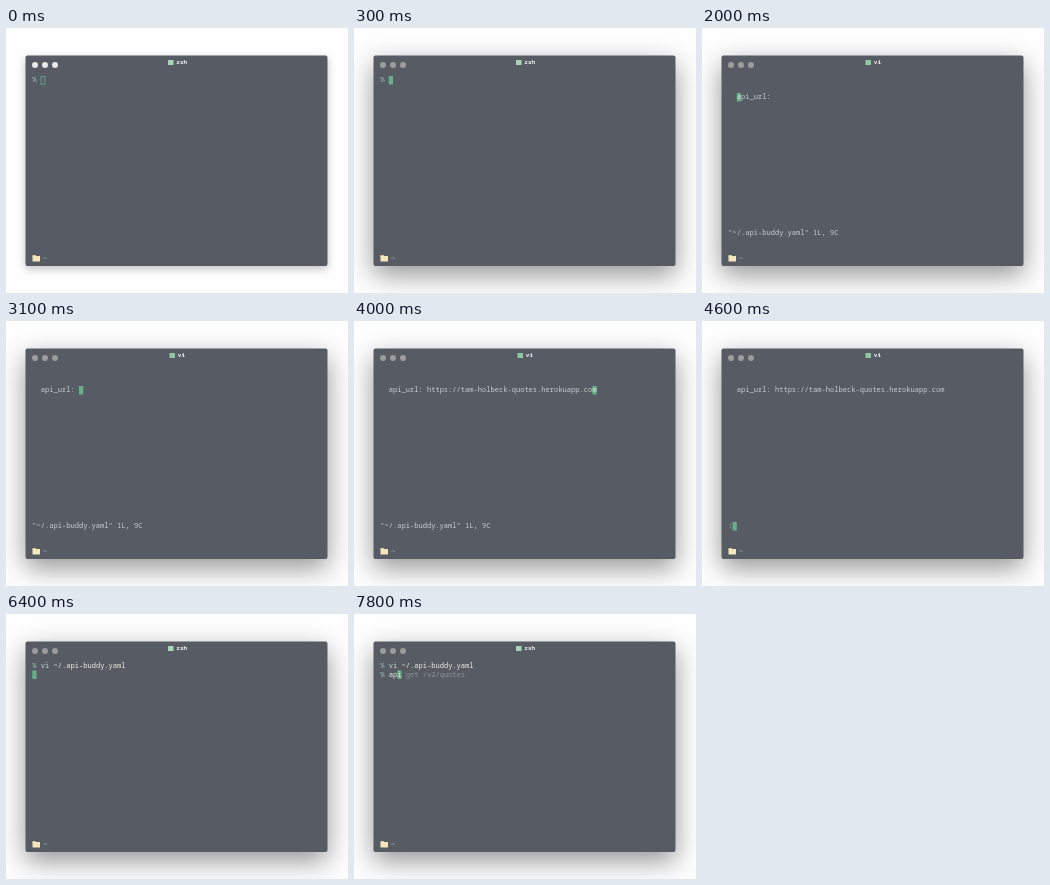
These frames come from a looping animation (342x265 px, 8 s). An HTML page with a canvas:

```html
<!DOCTYPE html>
<html lang="en">
<head>
<meta charset="utf-8">
<title>Terminal session</title>
<style>
  html, body { margin: 0; width: 100%; height: 100%; overflow: hidden; background: #fefefe; }
  canvas { display: block; }
</style>
</head>
<body>
<canvas id="stage" width="342" height="265"></canvas>
<script>
const ctx = document.getElementById('stage').getContext('2d');
const LOOP = 8000;
const CELL = 4.243, ROW = 8.5, LEFT = 26.3, TOP = 48;
const FONT = '7.07px "Noto Sans Mono", monospace';
const TITLE_FONT = 'bold 6px "Noto Sans Mono", monospace';
const color = {
  page: '#fefefe', pane: '#575c64', cursor: '#69ae8b', prompt: '#9fc0ac',
  command: '#c5d8ca', text: '#ecebdc', plain: '#c9cccd', hint: '#8e9498'
};

const FILE = '~/.api-buddy.yaml';
const OPEN = 'vi ' + FILE;
const CALL = 'api get /v2/quotes';
const URL_TEXT = 'https://tam-holbeck-quotes.herokuapp.com';
const STATUS = `"${FILE}" 1L, 9C`;
const STATUS_ROW = 18;

const run = (text, col, row, fill) => ({ text, col, row, fill });

function promptLine(line, typed, row) {
  return [
    run('%', 0, row, color.prompt),
    run(line.slice(0, typed), 2, row, color.text),
    run(line.slice(typed), 2 + typed, row, color.hint)
  ];
}

const ranOpen = [
  run('%', 0, 0, color.prompt),
  run('vi', 2, 0, color.command),
  run(FILE, 5, 0, color.text)
];

const shell = (runs, cursor) => ({ title: 'zsh', runs, cursor });
const firstLine = typed => shell(promptLine(OPEN, typed, 0), [2 + typed, 0]);
const secondLine = typed => shell([...ranOpen, ...promptLine(CALL, typed, 1)], [2 + typed, 1]);
const emptyLine = cursor => shell([run('%', 0, 0, color.prompt)], cursor);
const nextPrompt = cursor => shell([...ranOpen, run('%', 0, 1, color.prompt)], cursor);

const editor = (value, status, cursor) => ({
  title: 'vi',
  runs: [
    run('api_url: ' + value, 2, 2, color.plain),
    run(status, 0, STATUS_ROW, color.plain)
  ],
  cursor
});
const exCommand = (status, visible = true) =>
  editor(URL_TEXT, status, visible && [status.length, STATUS_ROW]);

const urlEnd = 11 + URL_TEXT.length;
const timeline = [
  [0, { ...emptyLine([2, 0]), hollow: true }],
  [100, emptyLine([2, 0])],
  [800, emptyLine(null)],
  [1000, firstLine(1)],
  [1100, firstLine(2)],
  [1200, firstLine(3)],
  [1500, shell(ranOpen, [2 + OPEN.length, 0])],
  [1800, { ...shell(ranOpen, [0, 1]), title: 'vi' }],
  [1900, { title: 'vi', runs: [], cursor: [0, 0] }],
  [2000, editor('', STATUS, [2, 2])],
  [2700, editor('', STATUS, [10, 2])],
  [3100, editor('', STATUS, [11, 2])],
  [3400, editor(URL_TEXT, STATUS, [urlEnd, 2])],
  [4000, editor(URL_TEXT, STATUS, [urlEnd - 1, 2])],
  [4500, exCommand(':')],
  [5100, exCommand(':', false)],
  [5700, exCommand(':')],
  [5900, exCommand(':w')],
  [6100, exCommand(':wq')],
  [6300, shell(ranOpen, [0, 1])],
  [6500, nextPrompt([2, 1])],
  [7100, nextPrompt(null)],
  [7600, secondLine(1)],
  [7800, secondLine(2)]
];

const mix = (a, b, k) => a + (b - a) * k;

function write(text, x, y, fill, font = FONT) {
  ctx.font = font;
  ctx.fillStyle = fill;
  ctx.fillText(text, x, y);
}

function drawWindow(focus) {
  ctx.save();
  ctx.shadowColor = `rgba(0, 0, 0, ${mix(0.24, 0.42, focus)})`;
  ctx.shadowBlur = mix(9, 27, focus);
  ctx.shadowOffsetY = mix(3, 9, focus);
  ctx.fillStyle = color.pane;
  ctx.beginPath();
  ctx.roundRect(19.5, 27.5, 302, 210.5, 2);
  ctx.fill();
  ctx.restore();

  const grey = Math.round(mix(232, 156, focus));
  ctx.fillStyle = `rgb(${grey}, ${grey}, ${grey})`;
  for (const x of [29, 39, 49]) {
    ctx.beginPath();
    ctx.arc(x, 37, 3, 0, Math.PI * 2);
    ctx.fill();
  }
}

function drawTitle(title) {
  const x = title === 'vi' ? 163.5 : 162;
  ctx.fillStyle = title === 'vi' ? '#8fc9a4' : '#a9d3b5';
  ctx.fillRect(x, 32, 5.5, 5);
  write(title, x + 8.3, 36.3, '#f0f1ee', TITLE_FONT);
}

function drawFolder() {
  ctx.fillStyle = '#d9c99a';
  ctx.fillRect(26.5, 227, 3.5, 2);
  ctx.fillStyle = '#f3e6bd';
  ctx.fillRect(26.5, 228, 7.5, 5.5);
  write('~', 37, 232.5, color.prompt);
}

function drawCursor({ cursor, hollow, runs }) {
  if (!cursor) return;
  const [col, row] = cursor;
  const x = LEFT + col * CELL, y = TOP + row * ROW;
  if (hollow) {
    ctx.strokeStyle = color.cursor;
    ctx.lineWidth = 0.8;
    ctx.strokeRect(x + 0.2, y + 0.5, CELL - 0.4, ROW - 0.8);
    return;
  }
  ctx.fillStyle = color.cursor;
  ctx.fillRect(x, y, CELL, ROW);
  const under = runs.find(r => r.row === row && col >= r.col && col < r.col + r.text.length);
  if (under) write(under.text[col - under.col], x, y + 6.3, '#dbe6dc');
}

function draw(time) {
  const scene = timeline.findLast(([start]) => start <= time)[1];
  const focus = Math.min(1, Math.floor(time / 100) / 3);
  ctx.fillStyle = color.page;
  ctx.fillRect(0, 0, 342, 265);
  drawWindow(focus);
  drawTitle(scene.title);
  for (const { text, col, row, fill } of scene.runs) {
    write(text, LEFT + col * CELL, TOP + row * ROW + 6.3, fill);
  }
  drawCursor(scene);
  drawFolder();
}

const began = performance.now();
function tick() {
  draw((performance.now() - began) % LOOP);
  requestAnimationFrame(tick);
}
tick();
</script>
</body>
</html>
```
